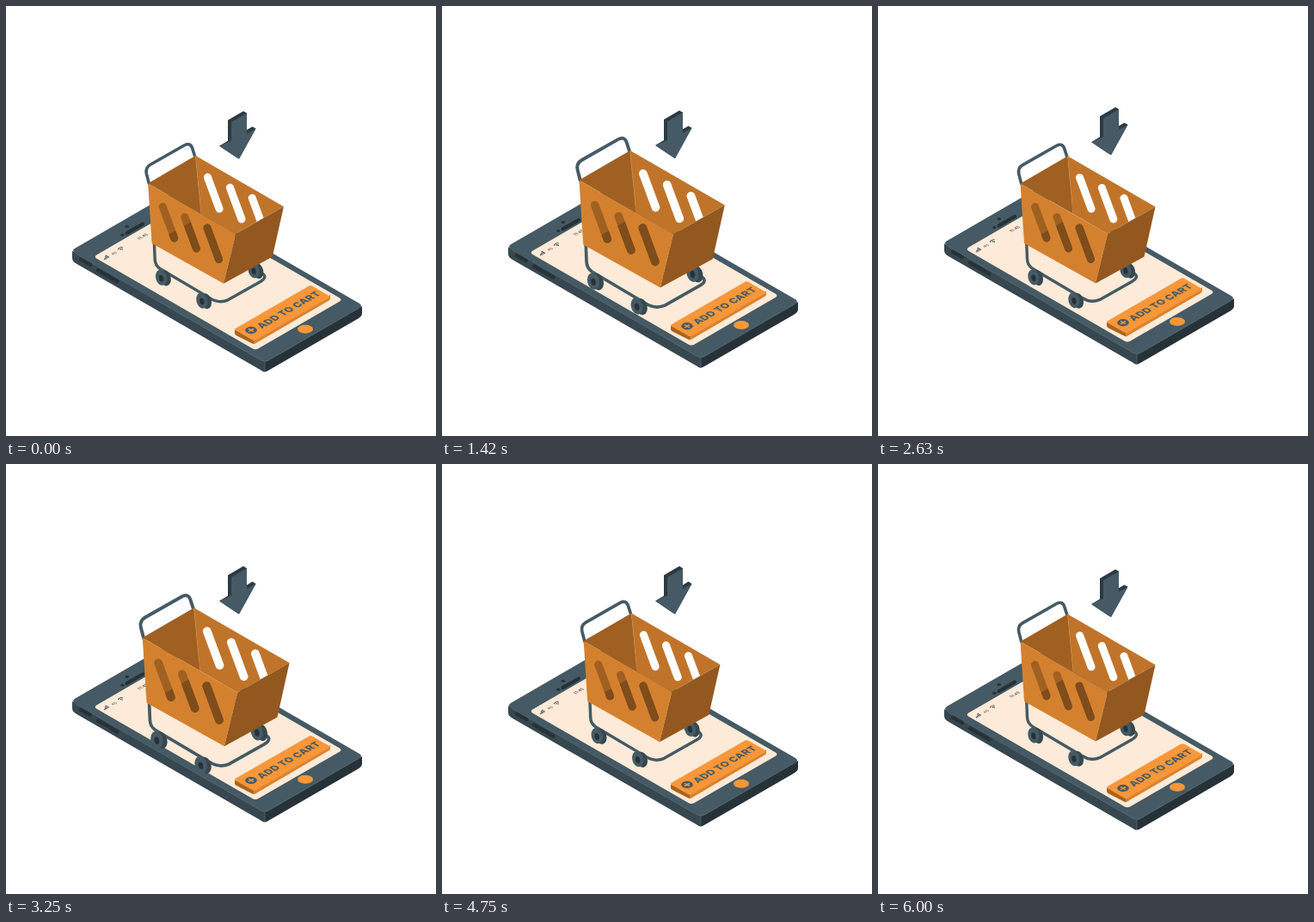
Recreate the animation shown at these times as an HTML page. Size 500 by 500 pixels, loop 6040 ms.

```html
<!DOCTYPE html>
<html lang="en">
<head>
<meta charset="utf-8">
<title>Add to cart</title>
<style>
  html, body { margin: 0; width: 100%; height: 100%; overflow: hidden; background: #fff; }
  svg { display: block; width: 100vw; height: 100vh; }
  text { font-family: Inter, "Open Sans", sans-serif; }
</style>
</head>
<body>
<svg viewBox="0 0 500 500">
  <defs>
    <g id="wheel">
      <ellipse cx="2.5" cy="1" rx="6.2" ry="9.1" transform="rotate(-14)" fill="#37474f"/>
      <ellipse cx="-2" cy="-.8" rx="6.4" ry="9.2" transform="rotate(-14)" fill="#455a64"/>
      <ellipse cx="-2.2" cy="0" rx="2.5" ry="3.9" transform="rotate(-14)" fill="#263238"/>
    </g>
    <clipPath id="wall"><path d="M220.5 174 322.5 233 267 264.5 227 241.4Z"/></clipPath>
    <clipPath id="shade"><path d="M165 279.4 255 227.4V330H165Z"/></clipPath>
    <path id="slots" d="M182.5 233 196 269.5M208 245 221.5 281.5M234 257.5 247.5 294"/>
  </defs>

  <g id="phone">
    <path d="M77 285 301 405V425.6Q299 425.8 296 423.4L82 299.8Q77 297 77 293Z" fill="#37474f"/>
    <path d="M301 405 414 349V357.5Q414 360.8 409 363.8L306 423.4Q303 425.4 301 425.6Z" fill="#263238"/>
    <rect width="260.4" height="132.2" rx="5" transform="matrix(.866 .5 .866 -.5 75.5 284.5)" fill="#455a64"/>
    <path d="M81 288.3 297 412.2Q301 414 305 412.2L410 351.6M301 413.4V425" fill="none" stroke="#62757e" stroke-width=".6"/>
    <path d="M87 294.7 98 301M107 307.4 129.5 320.4" stroke="#263238" stroke-width="4.4" stroke-linecap="round"/>
    <rect width="217.4" height="117.2" rx="4" transform="matrix(.866 .5 .866 -.5 101.7 291.5)" fill="#fdead8"/>
    <path d="M140.5 264.2 159 253.6" stroke="#263238" stroke-width="4.2" stroke-linecap="round"/>
    <g fill="#263238">
      <ellipse cx="135.3" cy="266.3" rx="2.2" ry="1.6"/>
      <ellipse cx="140.8" cy="256.4" rx="2.2" ry="1.6"/>
    </g>

    <g fill="#37474f">
      <g transform="matrix(.866 -.5 .866 .5 114.8 295.4)">
        <path d="M0 0V-1.5H1.1V0ZM1.8 0V-2.6H2.9V0ZM3.6 0V-3.7H4.7V0ZM5.4 0V-5H6.5V0Z"/>
        <text x="11" y="0" font-size="4.4">4G</text>
        <path d="M21-2.9Q24-5.6 27-2.9M22.4-1.5Q24-3 25.6-1.5" fill="none" stroke="#37474f" stroke-width=".9"/>
        <circle cx="24" cy="-.4" r=".7"/>
      </g>
      <text transform="matrix(.866 -.5 .866 .5 155.3 272)" font-size="5" font-weight="500">11:45</text>
    </g>

    <path d="M266 376.5V380.8Q266 382.2 268 383.2L286 392.4Q288 393.4 289 393V386Z" fill="#a8641f"/>
    <path d="M288 386 377 336V340Q377 341.5 375 342.7L291.5 391.6Q290 392.8 288 393Z" fill="#d98230"/>
    <rect width="27" height="103" rx="2.6" transform="matrix(.866 .5 .866 -.5 265 376)" fill="#f7973a"/>
    <g fill="#455a64">
      <g transform="matrix(.866 -.5 .866 .5 285 377)">
        <circle r="5.6"/>
        <path d="M-3.3 0H3.3M0-3.3V3.3" stroke="#f7973a" stroke-width="1.7"/>
      </g>
      <text transform="matrix(.866 -.5 .866 .5 297.4 375.4)" font-size="11.3" font-weight="800" letter-spacing=".25">ADD TO CART</text>
    </g>
    <ellipse cx="348" cy="375.8" rx="9" ry="5" fill="#f7973a"/>
  </g>

  <g id="cart">
    <g fill="none" stroke="#455a64" stroke-width="3.6" stroke-linejoin="round">
      <path d="M167 207.5 163.8 195Q162.2 188 168.2 184.5L207.5 162.1Q214.4 158.6 216.6 165L220 175.5"/>
      <path d="M172.7 274 173.5 294Q173.8 301 179.5 304.8L237 338.8Q247.5 345.5 258 341L296 319.5Q303.5 315 298.5 311L281 301" stroke-width="3.4"/>
    </g>
    <use href="#wheel" x="183" y="315.3"/>
    <use href="#wheel" x="230" y="342"/>
    <use href="#wheel" x="290" y="307"/>

    <path d="M165.5 206 220.5 174 227 241.4Z" fill="#a06022"/>
    <path d="M220.5 174 322.5 233 267 264.5 227 241.4Z" fill="#c0742a"/>
    <path d="M220.5 174 227 241.4" stroke="#ca8440" stroke-width=".6"/>
    <path d="M234.5 199 248 235.5M260.3 211 273.8 247.5M286 223 299.5 259.5" clip-path="url(#wall)" stroke="#fff" stroke-width="9" stroke-linecap="round"/>
    <path d="M165.5 206 267 264.5 253 322 170 275.5Z" fill="#d4812f"/>
    <path d="M267 264.5 322.5 233 309.5 291 253 322Z" fill="#935820"/>
    <g stroke-width="9" stroke-linecap="round">
      <use href="#slots" stroke="#a06022"/>
      <g clip-path="url(#shade)"><use href="#slots" stroke="#7f4c1b"/></g>
    </g>
  </g>

  <g id="arrow">
    <path d="M258 132.9 276 122.4 280 124.7V144.2L286.5 140.4 290.5 142.7 271 178 267 175.7 248 162.9 258 156.9Z" fill="#2c3a41"/>
    <path d="M262 135.2 280 124.7V148.7L290.5 142.7 271 178 248.3 163 262 156.6Z" fill="#455a64"/>
  </g>
</svg>
<script>
  const LOOP = 6040, END = 6000, LEAD = 15;
  const BEAT = [[0, 1], [.1, 1.1], [.3, 1], [.4, 1], [.5, 1.1], [.6, 1], [1, 1]];
  const phone = document.getElementById('phone');
  const cart = document.getElementById('cart');
  const arrow = document.getElementById('arrow');

  // Linear rise of 10 px and back once per period.
  const rise = (t, period) => {
    const p = t % period / period;
    return -10 * (1 - Math.abs(1 - 2 * p));
  };

  const beat = p => {
    const i = BEAT.findIndex(k => k[0] > p);
    const [a, from] = BEAT[i - 1], [b, to] = BEAT[i];
    return from + (to - from) * (p - a) / (b - a);
  };

  const shift = (el, y) => el.setAttribute('transform', `translate(0 ${y})`);

  function draw(now) {
    const t = Math.min(now % LOOP + LEAD, END);
    shift(phone, rise(t, 6000));
    shift(arrow, rise(t, 1500));
    const s = beat(t % 3000 / 3000);
    cart.setAttribute('transform', `translate(242.7 256.4) scale(${s}) translate(-242.7 -256)`);
  }

  const start = performance.now();
  function tick() {
    draw(performance.now() - start);
    requestAnimationFrame(tick);
  }
  tick();
</script>
</body>
</html>
```
